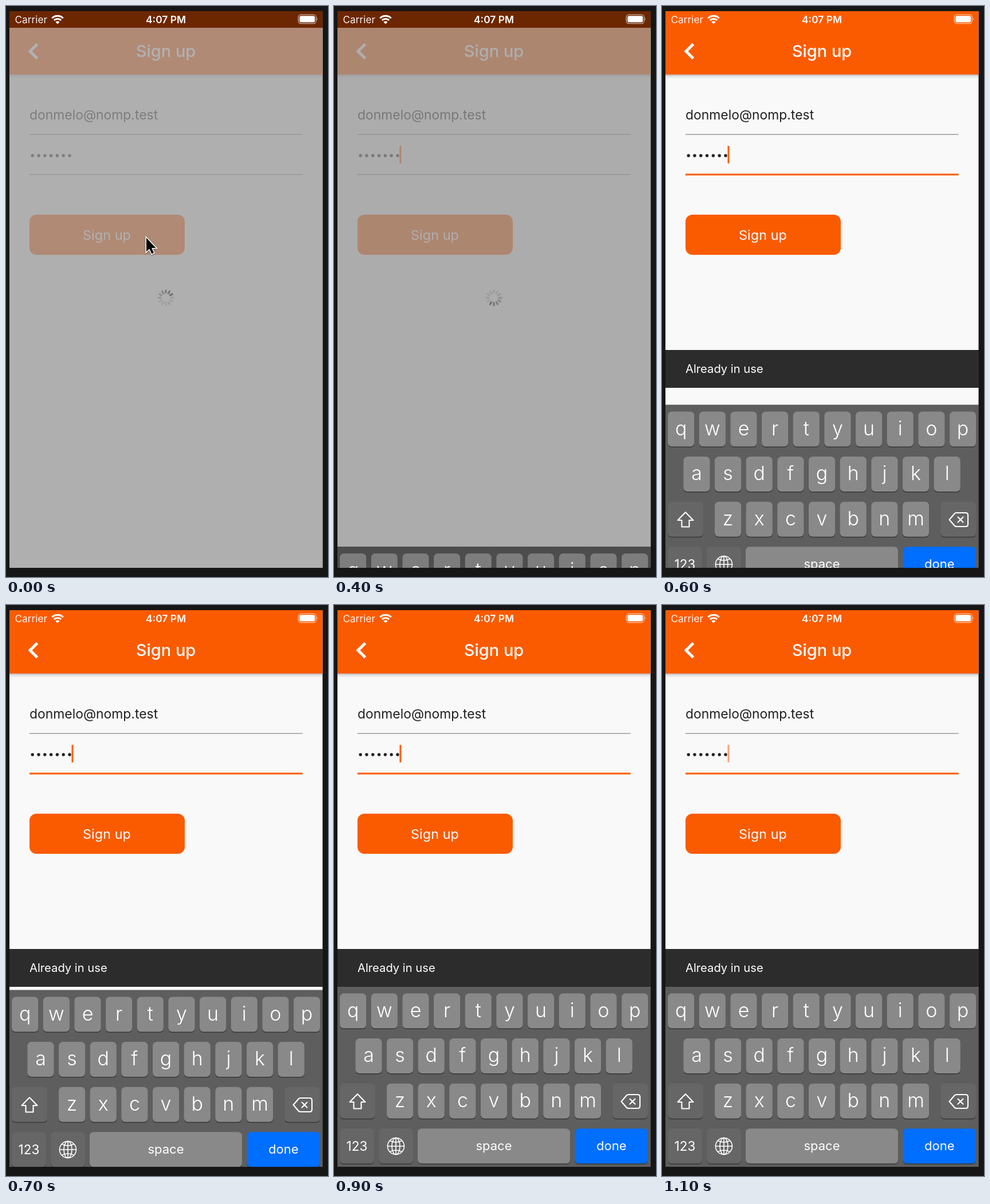
These frames come from a looping animation (562x996 px, 1200 ms). An HTML page:

```html
<!DOCTYPE html>
<html lang="en">
<head>
<meta charset="utf-8">
<title>Sign up</title>
<style>
  html, body { margin: 0; width: 100%; height: 100%; overflow: hidden; background: #161616; }
  svg { display: block; width: 100%; height: 100%; font-family: Inter, "Liberation Sans", sans-serif; }
  .mid { text-anchor: middle; }
  .accent { fill: #fb5b00; }
  .rule { fill: #9a9a9a; }
  .icon { fill: none; stroke: #fff; stroke-width: 2.1; stroke-linejoin: round; stroke-linecap: round; }

  .track { animation: 1.2s step-end infinite; }
  #barrier { animation-name: barrier; }
  #veil { animation-name: veil; }
  #spinner { animation-name: spinnerFade; }
  #ticks { animation-name: spin; transform-origin: 0 0; }
  #caret { animation-name: caret; }
  #focus { animation-name: focus; }
  #snack { animation-name: snack; }
  #message { animation-name: message; }
  #keyboard { animation-name: keyboard; }
  #pointer { animation-name: pointer; }

  @keyframes barrier { 0% { opacity: .57; } 41.6667% { opacity: .215; } 50%, 100% { opacity: 0; } }
  @keyframes veil { 0% { opacity: .46; } 33.3333% { opacity: .44; } 41.6667% { opacity: .145; } 50%, 100% { opacity: 0; } }
  @keyframes spinnerFade { 0% { opacity: 1; } 33.3333% { opacity: .95; } 41.6667% { opacity: .33; } 50%, 100% { opacity: 0; } }
  @keyframes spin {
    0% { transform: rotate(60deg); }
    8.3333% { transform: rotate(90deg); }
    16.6667% { transform: rotate(120deg); }
    25% { transform: rotate(180deg); }
    33.3333% { transform: rotate(210deg); }
    41.6667%, 100% { transform: rotate(240deg); }
  }
  @keyframes caret { 0% { opacity: 0; } 33.3333% { opacity: 1; } 91.6667%, 100% { opacity: .55; } }
  @keyframes focus { 0% { opacity: 0; } 41.6667% { opacity: .6; } 50%, 100% { opacity: 1; } }
  @keyframes snack {
    0% { transform: translateY(70px); }
    41.6667% { transform: translateY(17.5px); }
    50%, 100% { transform: none; }
  }
  @keyframes message { 0% { opacity: 0; } 50%, 100% { opacity: 1; } }
  @keyframes keyboard {
    0% { transform: translateY(340px); }
    33.3333% { transform: translateY(277.5px); }
    41.6667% { transform: translateY(145.5px); }
    50% { transform: translateY(30px); }
    58.3333% { transform: translateY(6px); }
    66.6667% { transform: translateY(1px); }
    75%, 100% { transform: none; }
  }
  @keyframes pointer { 0% { opacity: 1; } 33.3333%, 100% { opacity: 0; } }
</style>
</head>
<body>
<svg viewBox="0 0 562 996">
  <defs>
    <clipPath id="screen"><rect x="6" y="9" width="546.5" height="971"/></clipPath>
    <clipPath id="snackArea"><rect x="6" y="590" width="546.5" height="75.5"/></clipPath>
    <linearGradient id="shade" x2="0" y2="1">
      <stop offset="0" stop-opacity=".28"/>
      <stop offset=".4" stop-opacity=".1"/>
      <stop offset="1" stop-opacity="0"/>
    </linearGradient>
  </defs>

  <g clip-path="url(#screen)">
    <!-- Page -->
    <rect x="6" y="9" width="547" height="971" fill="#f9f9f9"/>
    <rect x="6" y="119" width="547" height="8" fill="url(#shade)"/>
    <rect class="accent" x="6" y="9" width="547" height="110.5"/>
    <path d="M54.5 66.5L42 79l12.500 12.500" fill="none" stroke="#fff" stroke-width="5"/>
    <text class="mid" x="279" y="89" font-size="29" font-weight="500" fill="#fff">Sign up</text>

    <text x="41" y="197.500" font-size="22.900" fill="#212121">donmelo@nomp.test</text>
    <rect class="rule" x="41" y="223.300" width="476.500" height="1.500"/>
    <g id="dots" fill="#212121"></g>
    <rect class="rule" x="41" y="293.300" width="476.500" height="1.500"/>
    <rect id="focus" class="track accent" x="41" y="292.500" width="476.500" height="3"/>
    <rect id="caret" class="track accent" x="114.500" y="244" width="3" height="30.500"/>

    <rect class="accent" x="41" y="364" width="271" height="70" rx="12"/>
    <text class="mid" x="176" y="408" font-size="23.500" fill="#fff">Sign up</text>

    <g clip-path="url(#snackArea)">
      <g id="snack" class="track">
        <rect x="6" y="600" width="547" height="66" fill="#2c2c2c"/>
        <text id="message" class="track" x="41" y="640" font-size="20.200" fill="#fff">Already in use</text>
      </g>
    </g>

    <!-- Loading layer -->
    <rect id="barrier" class="track" x="6" y="9" width="547" height="971"/>
    <rect id="veil" class="track" x="6" y="38" width="547" height="942" fill="#fff"/>
    <g transform="translate(279 509)">
      <g id="spinner" class="track"><g id="ticks" class="track"></g></g>
    </g>

    <!-- Status bar -->
    <g fill="#fff">
      <text x="15.500" y="29.500" font-size="17.300" opacity=".93">Carrier</text>
      <text class="mid" x="279" y="29.500" font-size="17.400" font-weight="600">4:07 PM</text>
      <g fill="none" stroke="#fff" stroke-width="3">
        <path d="M80.300 21.300A13.700 13.700 0 0 1 99.700 21.300M83.900 24.900A8.700 8.700 0 0 1 96.100 24.900"/>
      </g>
      <path d="M90 31.500L86.500 27.900A4.900 4.900 0 0 1 93.500 27.900Z"/>
      <rect x="510.200" y="15.200" width="31" height="15.400" rx="4.500" fill="none" stroke="#fff" stroke-width="1.300" opacity=".65"/>
      <rect x="512.300" y="17.300" width="26.800" height="11.200" rx="2.700"/>
      <path d="M542.700 20.500q2.200 2.400 0 4.800z" opacity=".65"/>
    </g>

    <!-- Keyboard -->
    <g id="keyboard" class="track">
      <rect x="6" y="665.500" width="547" height="340" fill="#323232" fill-opacity=".78"/>
      <g id="keys" class="mid" fill="#fff"></g>
      <path class="icon" d="M41 853L54.500 867H47.500V878.500H34.500V867H27.500Z"/>
      <path class="icon" d="M501.500 866L510.500 855.500q1.200-1.500 3.500-1.500H530q4 0 4 4V874q0 4-4 4H514q-2.300 0-3.500-1.500ZM516.500 861.500l9 9m0-9l-9 9"/>
      <g class="icon" style="stroke-width:1.600">
        <circle cx="108" cy="944" r="14.500"/>
        <ellipse cx="108" cy="944" rx="7" ry="14.500"/>
        <path d="M108 929.500v29M93.500 944h29M97.500 934.500q10.500 5 21 0M97.500 953.500q10.500-5 21 0"/>
      </g>
    </g>
  </g>

  <path id="pointer" class="track" d="M245 404.500V428.500L250.400 423.500L254.300 432.300L258 430.700L254.200 422H261.600Z"
        stroke="#fff" stroke-width="3" paint-order="stroke" style="filter:drop-shadow(0 1px 1px rgba(0,0,0,.4))"/>
</svg>
<script>
  const put = (id, markup) => { document.getElementById(id).innerHTML = markup; };
  const repeat = (n, make) => Array.from({ length: n }, (_, i) => make(i)).join('');

  put('dots', repeat(7, i => `<circle cx="${46.2 + i * 10.8}" cy="261" r="2.7"/>`));

  // The darkest tick leads, the ones behind it fade out.
  put('ticks', repeat(12, i => {
    const alpha = 0.1 + 0.32 * Math.max(0, 1 - i / 6);
    return `<rect x="-1.45" y="-14.6" width="2.9" height="7.3" rx="1.45" transform="rotate(${-30 * i})" fill-opacity="${alpha}"/>`;
  }));

  const PITCH = 54.65, KEY_W = 46, KEY_H = 61, R = 7;
  const rowTop = row => 677.5 + row * 78.6;

  function key(x, row, w, { label = '', size = 34, weight = 300, base = 41, fill = '#fff', alpha = 0.27 } = {}) {
    const y = rowTop(row), inner = w - 2 * R;
    const edge = `M${x} ${y + KEY_H - R}q0 ${R} ${R} ${R}h${inner}q${R} 0 ${R} ${-R}` +
      `v1.5q0 ${R} ${-R} ${R}h${-inner}q${-R} 0 ${-R} ${-R}z`;
    return `<rect x="${x}" y="${y}" width="${w}" height="${KEY_H}" rx="${R}" fill="${fill}" fill-opacity="${alpha}"/>` +
      `<path d="${edge}" fill="#000" fill-opacity=".4"/>` +
      `<text x="${x + w / 2}" y="${y + base}" font-size="${size}" font-weight="${weight}">${label}</text>`;
  }

  const letters = (text, row, left) =>
    [...text].map((label, i) => key(left + i * PITCH, row, KEY_W, { label })).join('');
  const word = { size: 22, weight: 400, base: 37.5 };
  const dark = { alpha: 0.05 };

  put('keys',
    letters('qwertyuiop', 0, 10.2) +
    letters('asdfghjkl', 1, 37.5) +
    key(10.2, 2, 61.5, dark) +
    letters('zxcvbnm', 2, 92.1) +
    key(486.5, 2, 61.5, dark) +
    key(10.2, 3, 59.5, { ...word, ...dark, label: '123', size: 22.5, base: 39 }) +
    key(78.3, 3, 59.5, dark) +
    key(146, 3, 266, { ...word, label: 'space' }) +
    key(420.5, 3, 127.5, { ...word, label: 'done', fill: '#006eff', alpha: 1 }));
</script>
</body>
</html>
```
